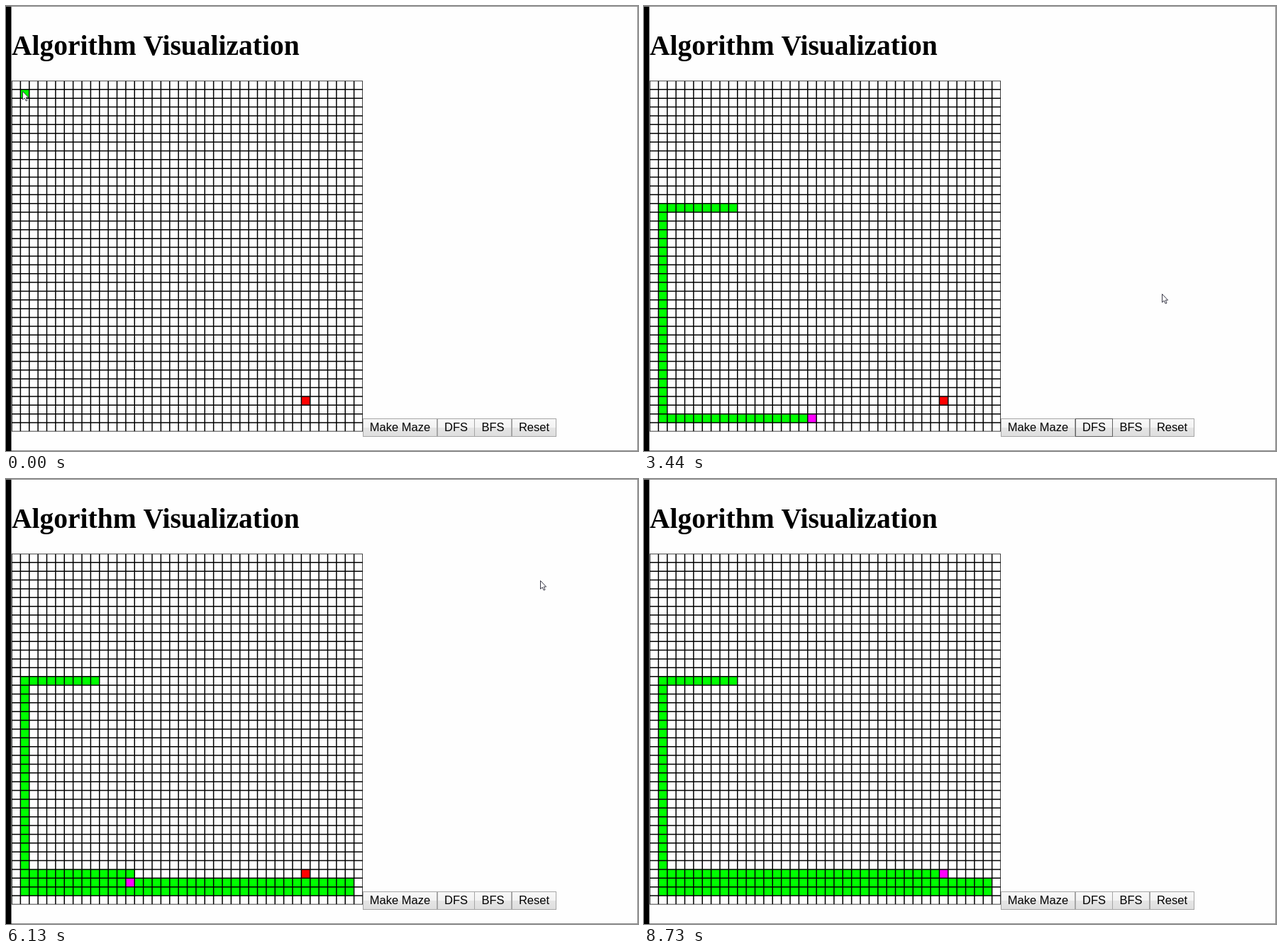
These frames come from a looping animation (891x628 px, 9.6 s). An HTML page with a canvas:

```html
<!DOCTYPE html>
<html lang="en">
<head>
<meta charset="utf-8">
<title>Algorithm Visualization</title>
<style>
  html, body { margin: 0; width: 100%; height: 100%; overflow: hidden; background: #fff; }
  canvas { display: block; }
</style>
</head>
<body>
<canvas id="stage" width="891" height="628"></canvas>
<script>
const ctx = document.getElementById('stage').getContext('2d');
const LOOP = 9600, FIRST_REFRESH = 270, REFRESH = 150;
const CELLS = 40, CELL = 12.375, LEFT = 8, TOP = 105.4, SIZE = CELLS * CELL;
const GOAL = [33, 36], HEAD = '#f0f', TRAIL = '#0f0';

// Moments, counted in screen refreshes.
const DROPPED = 3, HOVERED = 8, SEARCHING = 12, LEFT_BUTTON = 24;

// Key points: [refresh, value, ...]
const cursorKeys = [[-1, 23, 120], [DROPPED, 125, 284], [7, 617, 554], [9, 641, 588],
  [18, 641, 588], [21, 730, 406], [23, 833, 190], [25, 769, 133], [27, 755, 143],
  [51, 751, 143], [56, 830, 640]];
const stepKeys = [[SEARCHING, 6], [21, 49], [31, 93], [39, 132], [48, 171]];

function sample(keys, n) {
  const next = keys.findIndex(key => key[0] > n);
  if (next < 0) return keys[keys.length - 1].slice(1);
  if (next === 0) return keys[0].slice(1);
  const a = keys[next - 1], b = keys[next], k = (n - a[0]) / (b[0] - a[0]);
  return a.slice(1).map((v, i) => v + (b[i + 1] - v) * k);
}

// Depth-first search path, including the visited neighbours it looks back at.
const path = [[9, 14]];
function walkTo(x, y) {
  let [cx, cy] = path[path.length - 1];
  while (cx !== x || cy !== y) {
    cx += Math.sign(x - cx);
    cy += Math.sign(y - cy);
    path.push([cx, cy]);
  }
}
[[1, 14], [1, 38], [38, 38], [38, 37], [1, 37]].forEach(corner => walkTo(...corner));
path.push([2, 36], [1, 36], [2, 37]);
for (let x = 3; x < GOAL[0]; x++) path.push([x, 36], [x, 37]);
path.push(GOAL);

function fillCell([x, y], color) {
  ctx.fillStyle = color;
  ctx.fillRect(LEFT + x * CELL, TOP + y * CELL, CELL, CELL);
}

function drawPage() {
  ctx.fillStyle = '#fefefe';
  ctx.fillRect(0, 0, 891, 628);
  ctx.strokeStyle = '#8c8c8c';
  ctx.lineWidth = 1;
  ctx.strokeRect(.5, .5, 890, 627);
  ctx.fillStyle = '#000';
  ctx.fillRect(0, 1, 7.5, 627);
  ctx.font = 'bold 39.5px "Liberation Serif", serif';
  ctx.textAlign = 'left';
  ctx.fillText('Algorithm Visualization', 8, 69);
}

function drawGridLines() {
  ctx.save();
  ctx.beginPath();
  ctx.rect(LEFT, TOP, SIZE, SIZE);
  ctx.clip();
  ctx.beginPath();
  for (let i = 0; i <= CELLS; i++) {
    const x = LEFT + i * CELL, y = TOP + i * CELL;
    ctx.moveTo(x, TOP);
    ctx.lineTo(x, TOP + SIZE);
    ctx.moveTo(LEFT, y);
    ctx.lineTo(LEFT + SIZE, y);
  }
  ctx.strokeStyle = '#000';
  ctx.lineWidth = 1.5;
  ctx.stroke();
  ctx.restore();
}

function drawButton(label, left, right, active) {
  const shade = ctx.createLinearGradient(0, 582, 0, 608);
  [[0, '#f8f8f8'], [.5, '#f3f3f3'], [.5, '#e5e5e5'], [1, '#dedede']]
    .forEach(stop => shade.addColorStop(...stop));
  ctx.fillStyle = shade;
  ctx.fillRect(left, 582, right - left, 26);
  ctx.strokeStyle = active ? '#606060' : '#a6a6a6';
  ctx.lineWidth = 1;
  ctx.strokeRect(left + .5, 582.5, right - left - 1, 25);
  ctx.fillStyle = '#000';
  ctx.font = '16.5px "Liberation Sans", sans-serif';
  ctx.textAlign = 'center';
  ctx.fillText(label, (left + right) / 2, 600);
}

const arrow = new Path2D('M.5 .5V12.2L3.2 9.8L5.2 14L7 13.2L5.2 9.1H8.6Z');
function drawCursor(x, y) {
  ctx.save();
  ctx.translate(Math.round(x), Math.round(y));
  ctx.fillStyle = '#fff';
  ctx.fill(arrow);
  ctx.strokeStyle = '#3a3a48';
  ctx.lineWidth = 1;
  ctx.stroke(arrow);
  ctx.restore();
}

function drawCells(n, cursorX, cursorY) {
  fillCell(GOAL, '#f00');
  if (n < SEARCHING) {
    const dragged = [(cursorX - LEFT) / CELL, (cursorY - TOP) / CELL].map(Math.floor);
    fillCell(n < DROPPED ? dragged : path[0], TRAIL);
  } else {
    const step = Math.round(sample(stepKeys, n)[0]);
    path.slice(0, step).forEach(cell => fillCell(cell, TRAIL));
    fillCell(path[step], HEAD);
  }
}

function draw(n) {
  const [x, y] = sample(cursorKeys, n);
  drawPage();
  drawCells(n, x, y);
  drawGridLines();
  drawButton('Make Maze', 503, 608);
  drawButton('BFS', 660, 713);
  drawButton('Reset', 713, 776);
  drawButton('DFS', 608, 661, n >= HOVERED && n < LEFT_BUTTON);
  drawCursor(x, y);
}

const start = performance.now();
function tick() {
  const now = (performance.now() - start) % LOOP;
  draw(Math.floor((now - FIRST_REFRESH) / REFRESH));
  requestAnimationFrame(tick);
}
tick();
</script>
</body>
</html>
```
